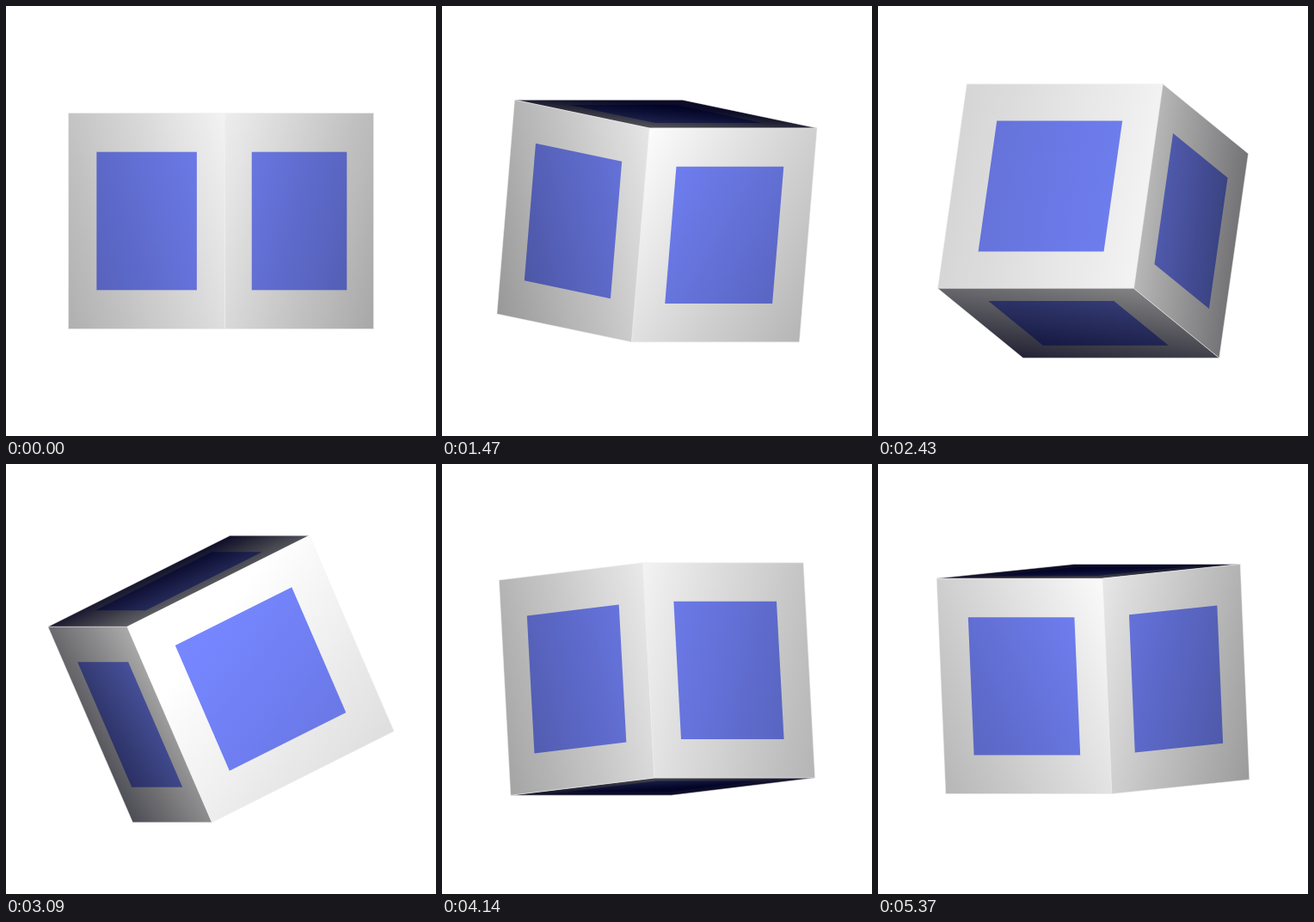
Animation, 500 px wide and 500 px high, one loop 5.4 s. Source, as an HTML page with a canvas:

```html
<!DOCTYPE html>
<html lang="en">
<head>
<meta charset="utf-8">
<title>Rotating cube</title>
<style>
html, body { margin: 0; width: 100%; height: 100%; overflow: hidden; background: #fff; }
canvas { display: block; width: 100vmin; height: 100vmin; }
</style>
</head>
<body>
<canvas width="500" height="500"></canvas>
<script>
const ctx = document.querySelector('canvas').getContext('2d');
const SIDE = 251, MID = 250, MARK = 0.64;
const FRAME = 30, FRAMES = 180, STEP = 1.99, YAW = 46.5;
const WHITE = [255, 255, 255], BLUE = [118, 134, 255];
const { sin, cos, abs, hypot, PI } = Math;

// Body axes in view space (x right, y up, z towards the viewer): yaw after roll.
function axesAt(n) {
  const c = -n * STEP * PI / 180, b = YAW * PI / 180 + c;
  return [
    [cos(b) * cos(c), sin(c), -sin(b) * cos(c)],
    [-cos(b) * sin(c), cos(c), sin(b) * sin(c)],
    [sin(b), 0, cos(b)]
  ];
}

// Unlit surfaces fall off to a dark navy.
function shade(color, light) {
  const l = Math.min(1, Math.max(0.07, light));
  const tint = 30 * (1 - l) ** 4;
  const rgb = color.map((v, i) => Math.round(v * l + (i === 2 ? tint : -tint / 4)));
  return `rgb(${rgb})`;
}

function gradient(color, base, gs, gt) {
  const len = hypot(gs, gt) || 1e-6;
  const half = (abs(gs) + abs(gt)) / 2;
  const x = gs / len * half / len, y = gt / len * half / len;
  const g = ctx.createLinearGradient(-x, -y, x, y);
  for (let i = 0; i <= 8; i++) {
    g.addColorStop(i / 8, shade(color, base + half * (i / 4 - 1)));
  }
  return g;
}

function drawFace(normal, u, v) {
  const [nx, ny, nz] = normal;
  const base = 0.05 + 0.17 * nx * nx + 0.95 * nz;
  const slope = a => 0.27 * a[2] + 0.08 * a[1];
  const fill = color => gradient(color, base, slope(u), slope(v));
  ctx.setTransform(SIDE * u[0], -SIDE * u[1], SIDE * v[0], -SIDE * v[1],
    MID + SIDE / 2 * nx, MID - SIDE / 2 * ny);
  ctx.beginPath();
  ctx.rect(-0.5, -0.5, 1, 1);
  ctx.fillStyle = fill(WHITE);
  ctx.fill();
  ctx.fillStyle = fill(BLUE);
  ctx.fillRect(-MARK / 2, -MARK / 2, MARK, MARK);
  ctx.resetTransform();
  ctx.strokeStyle = 'rgba(240, 240, 240, 0.5)';
  ctx.stroke();
}

function draw(now) {
  const axes = axesAt(Math.floor(now / FRAME) % FRAMES);
  ctx.resetTransform();
  ctx.fillStyle = '#fff';
  ctx.fillRect(0, 0, 500, 500);
  axes.forEach((axis, i) => {
    const normal = axis[2] < 0 ? axis.map(v => -v) : axis;
    if (normal[2] > 0.002) drawFace(normal, axes[(i + 1) % 3], axes[(i + 2) % 3]);
  });
}

const start = performance.now();
function tick() {
  draw(performance.now() - start);
  requestAnimationFrame(tick);
}
tick();
</script>
</body>
</html>
```
